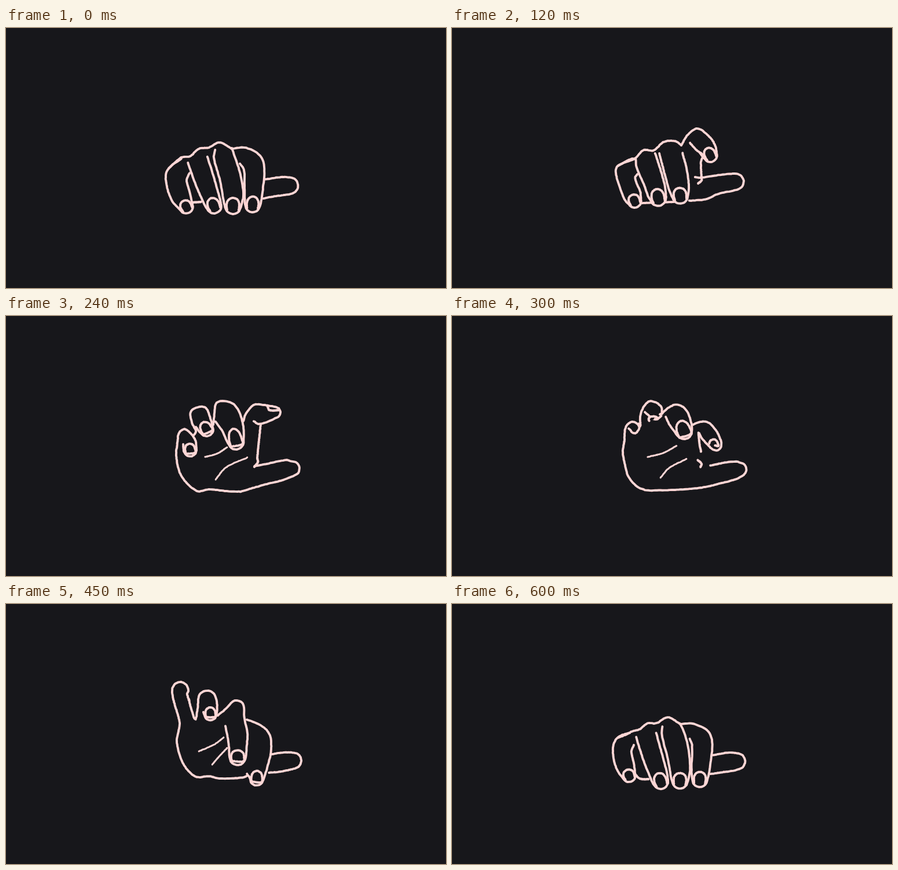
Recreate the animation shown at these times as an HTML page with a canvas. Size 760 by 450 pixels, loop 630 ms.

```html
<!DOCTYPE html>
<html lang="en">
<head>
<meta charset="utf-8">
<title>Drumming fingers</title>
<style>
html, body { margin: 0; width: 100%; height: 100%; overflow: hidden; background: #17171b; }
canvas { display: block; width: 760px; height: 450px; }
</style>
</head>
<body>
<canvas id="stage" width="760" height="450"></canvas>
<script>
const STEP = 30, STEPS = 21, SAMPLES = 64;
const INK = '#fed6d5', PAPER = '#17171b';
const ctx = document.getElementById('stage').getContext('2d');

// Drawing order; fingers hide what lies behind them.
const PARTS = ['thumb', 'palm', 'crease', 'fold', 'index', 'indexNail', 'pinky', 'pinkyNail',
  'ring', 'ringNail', 'middle', 'middleNail', 'ridge', 'web', 'tick'];
const SOLID = /^(index|pinky|ring|middle)/;

// Key poses. A finger is "one side | tip x,y,radius,nail length | other side",
// the nail length in tip radii; all other lines are plain curves.
const POSES = [
  { at: 0,
    thumb: '445,295 465,291 | 490,273,14.5,0 | 475,258 448,262',
    palm: '337,301 322,302',
    pinky: '303,226 280,244 276,262 285,296 | 311,309,12,.9 | 316,280 312,263 317,251',
    ring: '314,233 328,272 338,295 | 359,308,13,1.1 | 368,290 355,245 348,223',
    middle: '361,211 359,225 370,265 375,295 | 392,308,14,1 | 410,288 404,250 390,208',
    index: '404,235 411,245 412,280 | 426,306,13,1.1 | 443,285 446,240 438,220 413,207 391,209',
    ridge: '281,243 303,224 318,222 333,209 350,207 369,198 390,209' },
  { at: 4,
    thumb: '410,299 440,296 460,287 | 490,266,14,0 | 465,254 430,259 420,258',
    palm: '384,301 327,303',
    pinky: '317,226 286,239 283,252 297,295 | 315,299,12,.9 | 325,283 316,260 320,253',
    ring: '317,226 319,242 332,272 339,292 | 356,294,14,1.1 | 365,262 351,217',
    middle: '358,217 374,277 | 394,290,14,.95 | 409,270 405,242 398,216',
    index: '428,216 | 446,220,12,1.1 | 455,205 447,191 425,174 408,184 396,203',
    ridge: '286,239 308,227 317,225 331,211 348,212 366,197 386,196 396,203',
    web: '411,199 422,211 433,220 430,232 431,259',
    tick: '431,258 431,264 425,269' },
  { at: 8,
    thumb: '405,304 450,291 475,285 | 494,264,13,0 | 485,249 445,257 429,260',
    palm: '405,304 380,303 350,300 330,303 303,277 294,243 296,220',
    crease: '382,227 365,238 344,244',
    fold: '417,245 380,262 362,283',
    pinky: '306,222 | 318,232,11,1 | 326,213 310,196 299,202 296,220',
    ring: '328,192 | 346,196,12,1.1 | 354,180 345,159 330,158 319,166 321,184 328,200 323,208',
    middle: '362,183 374,200 | 397,217,14,1.6 | 409,185 396,155 377,147 363,151 360,170 358,188',
    index: '428,182 436,187 452,183 | 464,167,10,0 | 445,154 428,154 414,170 410,182',
    indexNail: '452,157 455,163 472,163',
    web: '440,187 436,225 434,246',
    tick: '434,246 435,253 429,261' },
  { at: 12,
    thumb: '453,291 470,290 | 496,268,14,0 | 480,254 464,257',
    palm: '453,291 410,299 380,303 362,300 345,304 325,300 308,282 302,260 296,235 299,215',
    crease: '394,222 365,236 332,244',
    fold: '393,250 370,264 358,277',
    pinky: '304,168 | 315,161,9,0 | 320,146 304,144 294,158 299,200 299,215',
    ring: '338,141 | 356,137,14,0 | 366,122 350,119 335,129 331,150 332,175 329,198 324,180 322,165',
    ringNail: '340,158 350,164 360,152',
    middle: '376,166 381,182 | 404,183,16,1 | 416,163 404,146 392,141 377,150 371,165 364,187 361,170 360,152',
    index: '426,224 430,248 433,270 | 446,280,12,1.4 | 464,255 461,225 453,213 440,205 404,203',
    web: '411,217 422,234 426,224',
    tick: '415,253 430,256 429,262' },
  { at: 15,
    thumb: '454,292 475,290 | 496,271,14,0 | 478,257 459,260',
    palm: '422,294 410,300 370,302 350,298 328,299 307,278 295,240 298,220',
    crease: '376,231 360,243 333,255',
    fold: '382,249 368,264 356,278',
    pinky: '318,172 313,156 | 301,149,14,0 | 289,165 300,205 298,220',
    ring: '341,187 | 353,190,11,1 | 364,168 358,154 346,150 334,157 331,180 327,200 320,182 316,165',
    middle: '379,211 385,245 | 400,265,14,.85 | 416,245 417,222 412,200 409,172 395,167 380,181 366,193',
    index: '416,294 | 433,302,12,1.1 | 452,280 458,252 455,225 440,210 416,200' },
  { at: 18,
    thumb: '450,293 475,291 | 496,271,14,0 | 478,256 455,261',
    palm: '345,307 325,307 311,299 306,280',
    pinky: '314,217 298,209 281,226 279,262 | 295,272,12,.8 | 308,258 306,240 309,231',
    ring: '326,225 330,245 344,295 | 363,305,14,1.1 | 376,288 365,240 362,224',
    middle: '368,215 372,245 382,290 | 397,301,14,.8 | 414,280 415,240 410,213 400,203',
    index: '424,230 420,255 417,285 | 432,299,13.5,.8 | 449,285 456,245 452,222 430,210 402,204',
    ridge: '300,208 318,217 348,200 361,205 380,192 400,204' }
];

const mix = (a, b, t) => a + (b - a) * t;
const mixPoint = (p, q, t) => [mix(p[0], q[0], t), mix(p[1], q[1], t)];
const dist = (p, q) => Math.hypot(q[0] - p[0], q[1] - p[1]);
const points = text => text.trim().split(' ').map(s => s.split(',').map(Number));

// Hermite curve from b to c, tangents weighted by the spacing of the points.
function curve(a, b, c, d, t) {
  const h = dist(b, c), u = t * t * (3 - 2 * t);
  const inB = h / (dist(a, b) + h), inC = h / (h + dist(c, d));
  return [0, 1].map(k => mix(b[k], c[k], u)
    + t * (1 - t) * (1 - t) * (c[k] - a[k]) * inB
    - t * t * (1 - t) * (d[k] - b[k]) * inC);
}

// Smooth line through the points, sampled at equal distances.
function sample(p) {
  const at = i => p[Math.max(0, Math.min(p.length - 1, i))];
  const fine = [p[0]], run = [0];
  for (let i = 0; i < p.length - 1; i++) {
    for (let k = 1; k <= 8; k++) {
      const q = curve(at(i - 1), at(i), at(i + 1), at(i + 2), k / 8);
      run.push(run[run.length - 1] + dist(fine[fine.length - 1], q));
      fine.push(q);
    }
  }
  const total = run[run.length - 1];
  let j = 1;
  return Array.from({ length: SAMPLES }, (_, i) => {
    const d = total * i / (SAMPLES - 1);
    while (j < run.length - 1 && run[j] < d) j++;
    return mixPoint(fine[j - 1], fine[j], (d - run[j - 1]) / (run[j] - run[j - 1] || 1));
  });
}

// Two sides joined by a round tip, and a nail pointing the same way.
function finger(text, closed) {
  const [near, tip, far] = text.split('|').map(points);
  const [x, y, r, nail] = tip[0];
  const base = mixPoint(near[near.length - 1], far[0], 0.5);
  const turn = Math.atan2(y - base[1], x - base[0]);
  const place = (along, across) => [
    x + r * (along * Math.cos(turn) + across * Math.sin(turn)),
    y + r * (along * Math.sin(turn) - across * Math.cos(turn))];
  const cap = [], arch = [];
  for (let i = -2; i <= 2; i++) {
    const a = i * Math.PI / 4;
    cap.push(place(Math.cos(a), Math.sin(a)));
    arch.push(place(-0.2 - (nail - 0.2) * Math.cos(a), 0.78 * Math.sin(a)));
  }
  const ends = [place(0.5, -0.72), place(0.5, 0.72)];
  const rim = [ends[0], ...arch, ends[1]];
  if (closed) rim.push(ends[0]);
  return { line: sample([...near, ...cap, ...far]), nail: nail ? sample(rim) : null };
}

for (const pose of POSES) {
  for (const part of PARTS) {
    const text = pose[part];
    if (typeof text !== 'string') continue;
    if (text.includes('|')) {
      const made = finger(text, !pose.ridge);
      pose[part] = made.line;
      if (made.nail) pose[part + 'Nail'] = made.nail;
    } else {
      pose[part] = sample(points(text));
    }
  }
}
POSES.push({ ...POSES[0], at: STEPS });

// A line known to one pose only is shown while the hand is near that pose.
function blend(a, b, t) {
  if (a && b) return a.map((p, i) => mixPoint(p, b[i], t));
  return t < 0.4 ? a : t > 0.6 ? b : null;
}

// Small repeatable wobble for a hand-drawn edge.
function wobble(n) {
  const s = Math.sin(n * 12.9898) * 43758.5453;
  return (s - Math.floor(s) - 0.5) * 0.6;
}

function drawLine(line, solid, seed) {
  ctx.beginPath();
  line.forEach(([x, y], i) => ctx.lineTo(x + wobble(seed + i), y + wobble(seed + i + 500)));
  if (solid) ctx.fill();
  ctx.stroke();
}

function draw(step) {
  let k = POSES.length - 2;
  while (k > 0 && POSES[k].at > step) k--;
  const a = POSES[k], b = POSES[k + 1];
  const t = (step - a.at) / (b.at - a.at);
  ctx.fillStyle = PAPER;
  ctx.fillRect(0, 0, 760, 450);
  ctx.strokeStyle = INK;
  ctx.lineCap = ctx.lineJoin = 'round';
  PARTS.forEach((part, n) => {
    const line = blend(a[part], b[part], t);
    if (!line) return;
    ctx.lineWidth = part === 'crease' || part === 'fold' ? 3 : 3.9;
    drawLine(line, SOLID.test(part), n * 70 + step * 7);
  });
}

let shown = -1;
const start = performance.now();
function tick(now) {
  const step = Math.floor(Math.max(0, now - start) / STEP) % STEPS;
  if (step !== shown) draw(shown = step);
  requestAnimationFrame(tick);
}
tick(start);
</script>
</body>
</html>
```
